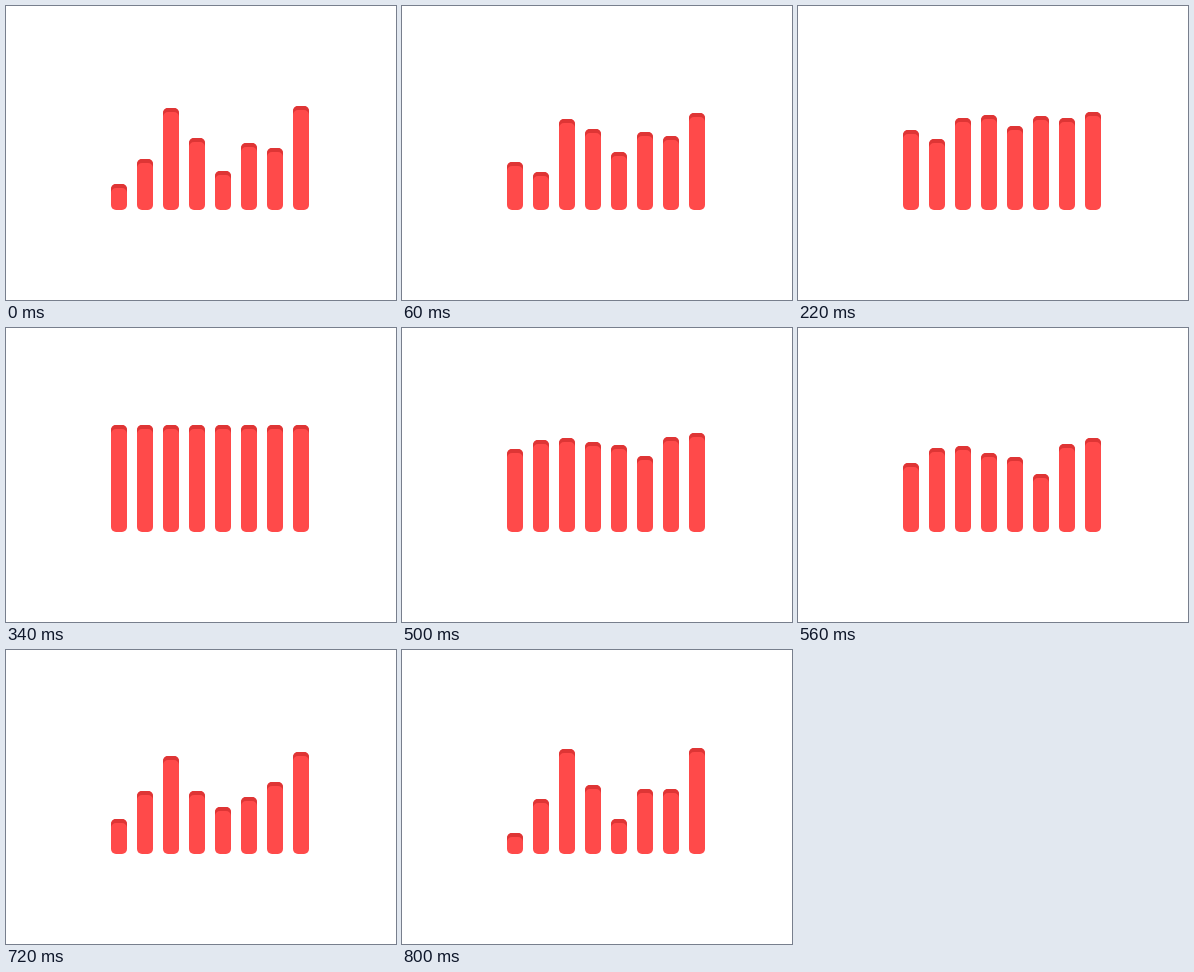
Write an HTML page that moves like this. It is 390 by 294 pixels and loops after 0.82 s.

```html
<!DOCTYPE html>
<html lang="en">
<head>
<meta charset="utf-8">
<title>Equalizer</title>
<style>
  html, body { margin: 0; width: 100%; height: 100%; overflow: hidden; background: #fff; }
  .bar {
    position: absolute;
    bottom: calc(100% - 204px);
    width: 16px;
    border-radius: 5px;
    background: #ff4a4a;
    box-shadow: inset 0 4px 0 #de3535;
  }
  #stage { position: relative; width: 390px; height: 294px; overflow: hidden; }
</style>
</head>
<body>
<div id="stage"></div>
<script>
const LOOP = 820, TICK = 20, FULL = 107;

// Time in ms to phase: every bar is full at phase 0.5 and rests there briefly.
const PACE = [
  [0, .031], [60, .157], [220, .343], [340, .5], [380, .5],
  [500, .64], [640, .832], [800, 1], [820, 1.031]
];

// Turning points of each bar: phase, height.
const BARS = [
  [[0, 20.7], [.5, FULL]],
  [[.186, 35], [.5, FULL]],
  [[0, 104.6], [.247, 83.2], [.5, FULL], [.737, 85]],
  [[.5, FULL], [.878, 60]],
  [[0, 35], [.5, FULL]],
  [[.5, FULL], [.777, 45.7]],
  [[.033, 62], [.5, FULL]],
  [[0, 106], [.243, 92.3], [.5, FULL], [.736, 93.5]]
];

function lerpAt(points, x) {
  const i = Math.max(1, points.findIndex(p => p[0] >= x));
  const [x0, y0] = points[i - 1], [x1, y1] = points[i];
  return y0 + (y1 - y0) * (x - x0) / (x1 - x0);
}

// Repeat the turning points on both sides so the phase can wrap.
const cyclic = keys => [-1, 0, 1].flatMap(n => keys.map(([u, h]) => [u + n, h]));

const stage = document.getElementById('stage');
const bars = BARS.map((keys, i) => {
  const el = document.createElement('div');
  el.className = 'bar';
  el.style.left = 105 + 26 * i + 'px';
  el.style.bottom = '90px';
  stage.append(el);
  return { el, keys: cyclic(keys) };
});

function draw(ms) {
  const t = Math.floor(ms % LOOP / TICK) * TICK;
  const phase = lerpAt(PACE, t) % 1;
  for (const { el, keys } of bars) el.style.height = lerpAt(keys, phase).toFixed(2) + 'px';
}

const start = performance.now();
function frame() {
  draw(performance.now() - start);
  requestAnimationFrame(frame);
}
frame();
</script>
</body>
</html>
```
